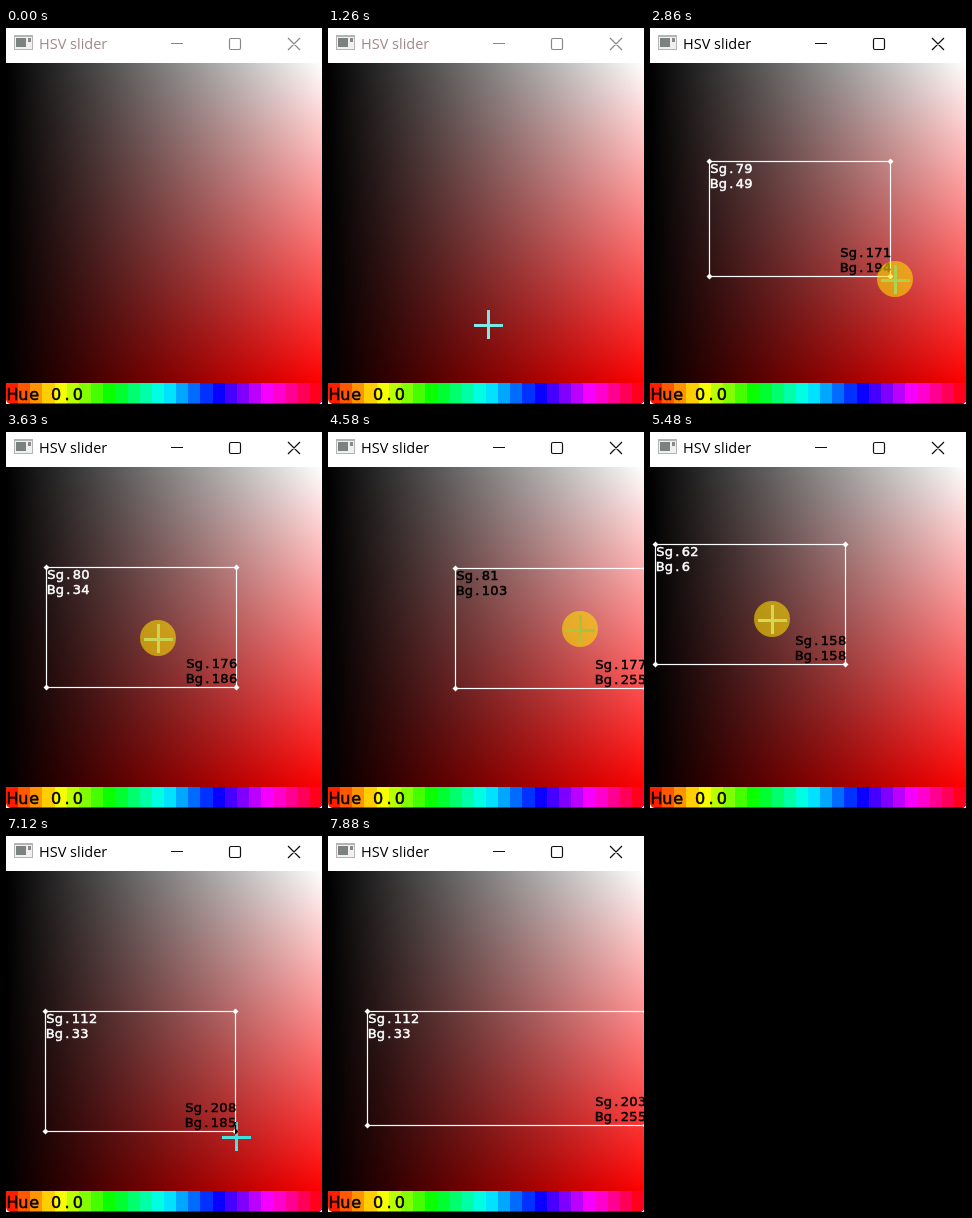
An HTML page with a canvas that plays this animation: 316x376 px, repeating every 8000 ms.

```html
<!DOCTYPE html>
<html lang="en">
<head>
<meta charset="utf-8">
<title>HSV slider</title>
<style>
html, body { margin: 0; height: 100%; overflow: hidden; background: #fff; }
canvas { display: block; }
</style>
</head>
<body>
<canvas id="stage" width="316" height="376"></canvas>
<script>
const W = 316, H = 376, TOP = 35, BAR = 355, LOOP = 8000;
const LAG = 40;     // the box trails the pointer
const BANDS = 26;   // hue steps in the bottom bar
const g = document.getElementById('stage').getContext('2d');

// Pointer route: time, x, y
const route = [
  [910, 205, 395], [1700, 72, 140], [1820, 60, 134], [2060, 108, 165],
  [3000, 250, 254], [3080, 250, 254], [3340, 176, 202], [3490, 176, 202],
  [3590, 157, 204], [3720, 146, 214], [3950, 168, 245], [4540, 252, 205],
  [4850, 240, 108], [5130, 196, 115], [5440, 122, 181], [5920, 156, 244],
  [6100, 179, 297], [6300, 243, 308], [6850, 229, 301], [7450, 233, 299],
  [7840, 336, 293]];

// Spans of the three drags
const DRAW = [1820, 3000], MOVE = [3490, 5920], STRETCH = [7450, 7840];

// Smooth curve through the route that never overshoots
function pointer(t) {
  const last = route.length - 1;
  t = Math.max(route[0][0], Math.min(t, route[last][0]));
  let i = 0;
  while (i < last - 1 && route[i + 1][0] <= t) i++;
  const span = route[i + 1][0] - route[i][0], u = (t - route[i][0]) / span;
  return [1, 2].map(c => {
    const slope = k => k < 0 || k >= last ? 0 :
      (route[k + 1][c] - route[k][c]) / (route[k + 1][0] - route[k][0]);
    const tangent = k => {
      const a = slope(k - 1), b = slope(k);
      return a * b > 0 ? 2 * a * b / (a + b) : 0;
    };
    const p = route[i][c], q = route[i + 1][c];
    return p + (q - p) * u * u * (3 - 2 * u)
      + span * u * (1 - u) * ((1 - u) * tangent(i) - u * tangent(i + 1));
  });
}

// How far a drag has carried its object by time t
function dragged(t, [from, to]) {
  const [x0, y0] = pointer(from);
  const [x, y] = pointer(Math.max(from, Math.min(t - LAG, to)));
  return [Math.round(x - x0), Math.round(y - y0)];
}

function selectionAt(t) {
  const [w, h] = dragged(t, DRAW);
  const [mx, my] = dragged(t, MOVE);
  const [sx, sy] = dragged(t, STRETCH);
  const x = Math.min(W + 2 - w, 60 + mx), y = 134 + my;
  return { x, y, r: Math.min(W + 2, x + w + sx), b: y + h + sy };
}

const isPressed = t =>
  [DRAW, MOVE, STRETCH].some(([from, to]) => t >= from && t < to + LAG);

function box(x, y, w, h, color) {
  g.fillStyle = color;
  g.fillRect(x, y, w, h);
}

// Evenly spaced characters with a slightly heavy stroke
function label(text, x, y, px, cell, color) {
  g.font = px + 'px "DejaVu Sans", sans-serif';
  g.textAlign = 'center';
  g.fillStyle = g.strokeStyle = color;
  g.lineWidth = .5;
  [...text].forEach((ch, i) => {
    g.fillText(ch, x + (i + .5) * cell, y);
    g.strokeText(ch, x + (i + .5) * cell, y);
  });
}

function titleBar(active) {
  box(0, 0, W, TOP, '#fff');
  box(8, 7, 19, 15, '#b4b4b4');
  box(9, 9, 17, 12, '#f0f0f0');
  box(10, 10, 10, 9, '#7c8280');
  box(22, 10, 3, 4, '#888');
  g.font = '14.5px "Open Sans", sans-serif';
  g.textAlign = 'left';
  g.fillStyle = active ? '#000' : '#a08888';
  g.fillText('HSV slider', 33, 21);
  g.strokeStyle = active ? '#111' : '#888';
  g.lineWidth = 1.2;
  g.beginPath();
  g.moveTo(165, 15.5); g.lineTo(177, 15.5);
  g.roundRect(223.5, 10.5, 11, 11, 1.5);
  g.moveTo(282, 10); g.lineTo(294, 22);
  g.moveTo(294, 10); g.lineTo(282, 22);
  g.stroke();
}

function fade(x, y, from, to) {
  const grad = g.createLinearGradient(0, y ? TOP : 0, x, y);
  grad.addColorStop(0, from);
  grad.addColorStop(1, to);
  box(0, TOP, W, BAR - TOP, grad);
}

function colorField() {
  fade(0, BAR, '#fff', '#f00');
  fade(W, 0, '#000', 'rgba(0,0,0,0)');
  for (let i = 0; i < BANDS; i++) {
    const x = Math.round(i * W / BANDS);
    box(x, BAR, W - x, H - BAR, `hsl(${(i + .5) * 360 / BANDS} 100% 50%)`);
  }
  box(0, H - 1, W, 1, 'rgba(0,0,0,.5)');
  label('Hue 0.0', 1, 372, 16, 10.9, '#000');
}

function readout(x, y, edgeX, edgeY) {
  const sat = Math.round((edgeY - TOP) * 255 / (BAR - TOP));
  const val = Math.round(edgeX * .8 + 1);
  const color = val > 95 ? '#000' : '#fff';
  label('Sg.' + sat, x, y, 13, 8.55, color);
  label('Bg.' + val, x, y + 15, 13, 8.55, color);
}

function selection(t) {
  const { x, y, r, b } = selectionAt(t), [px, py] = pointer(t);
  const hot = !isPressed(t) && px < r && Math.abs(py - b) < 4;
  g.strokeStyle = '#fff';
  g.lineWidth = 1.2;
  g.strokeRect(x - .5, y - .5, r - x, b - y);
  if (hot) box(x, b - 2, r - x, 3, '#fff');
  g.fillStyle = '#fff';
  for (const cx of [x - .5, r - .5]) for (const cy of [y - .5, b - .5]) {
    g.beginPath();
    g.moveTo(cx - 3, cy); g.lineTo(cx, cy - 3);
    g.lineTo(cx + 3, cy); g.lineTo(cx, cy + 3);
    g.fill();
  }
  readout(x, y + 11, x, y);
  readout(r - 51, b - 20, r, b);
}

function crosshair(t) {
  const [x, y] = pointer(t).map(Math.round);
  g.globalCompositeOperation = 'difference';
  g.fillStyle = '#fff';
  g.beginPath();
  g.rect(x - 14, y, 29, 3);
  g.rect(x - 1, y - 14, 3, 29);
  g.fill();
  g.globalCompositeOperation = 'source-over';
  if (!isPressed(t)) return;
  g.fillStyle = 'rgba(255,225,0,.58)';
  g.beginPath();
  g.arc(x, y, 18, 0, 7);
  g.fill();
}

function draw(now) {
  const t = now % LOOP;
  g.clearRect(0, 0, W, H);
  g.save();
  g.beginPath();
  g.roundRect(0, 0, W, H, [0, 0, 5, 5]);
  g.clip();
  colorField();
  if (t >= DRAW[0]) selection(t);
  if (t >= route[0][0]) crosshair(t);
  titleBar(t >= DRAW[0]);
  g.restore();
  requestAnimationFrame(draw);
}
requestAnimationFrame(draw);
</script>
</body>
</html>
```
